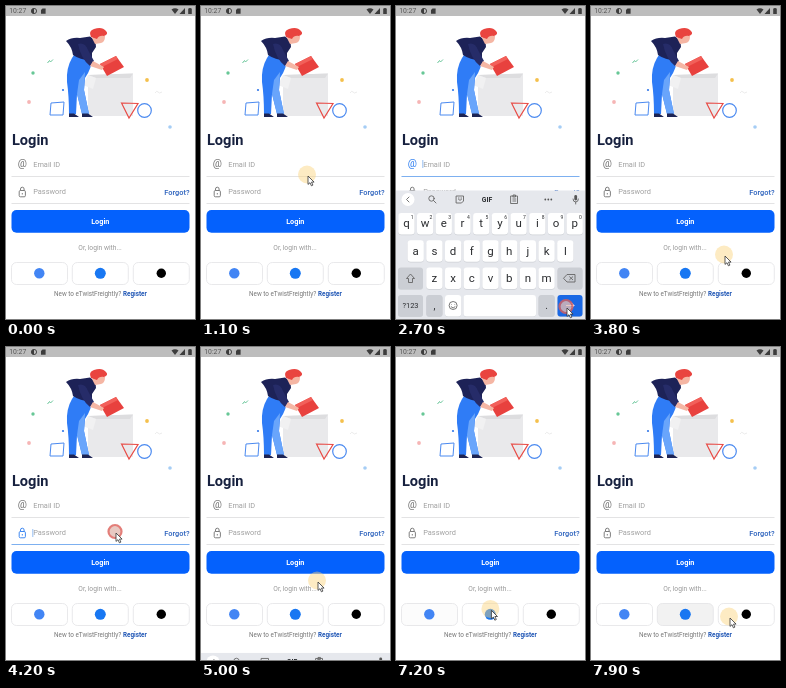
These frames come from a looping animation (189 by 313 pixels, 8 s). An HTML page:

```html
<!DOCTYPE html>
<html lang="en">
<head>
<meta charset="utf-8">
<title>Login screen</title>
<style>
html, body { margin: 0; width: 100%; height: 100%; overflow: hidden; background: #fff; }
svg { display: block; width: 100%; height: 100%; font-family: Roboto, Arial, sans-serif; }
.line { fill: none; stroke: #666; stroke-width: .9; }
.field { font-size: 7.4px; fill: #a0a0a0; }
.social rect { stroke: #e4e4e6; stroke-width: .8; }
.mid { text-anchor: middle; }
</style>
</head>
<body>
<svg viewBox="0 0 189 313">
  <!-- status bar -->
  <rect width="189" height="10" fill="#bdbdbd"/>
  <text x="3.300" y="7.400" font-size="6.800" fill="#555">10:27</text>
  <g fill="#3c3c3c">
    <circle cx="28" cy="5" r="2.600" fill="none" stroke="#3c3c3c" stroke-width=".9"/>
    <path d="M28 7.600V2.400A2.600 2.600 0 0 0 28 7.600Z"/>
    <path d="M36.500 2.400H39.600V7.800H35V4Z"/>
    <path d="M165.500 3.400Q169 1 172.500 3.400L169 8Z"/>
    <path d="M179 2V8H173.500Z"/>
    <path d="M182.200 2.600H183.200V2H184.800V2.600H185.800V8H182.200Z"/>
  </g>

  <!-- illustration -->
  <path d="M82 69L127 67.500V110H82Z" fill="#e9e9eb"/>
  <path d="M82 69L127 67.500L124 72H90Z" fill="#dddddf"/>
  <path d="M82 69L90 72L87 83L77 79Z" fill="#f1f1f2"/>
  <path d="M70 46L86 52Q86 62 79 72L78 84L83 108H76L71 88L70 108H63Q63 90 61 76Q60 62 66 52Z" fill="#2f7cf6"/>
  <path d="M79 66L78 84L83 108H76L71 88L73 74Z" fill="#69a5fb"/>
  <path d="M63 107.500H68L73 111H63ZM76 107.500H82L87 111H76Z" fill="#1d2454"/>
  <path d="M60 35Q66 31 74 32L84 30.500Q90 34 90 41L86 47L86 54Q76 55 67 49Q66 41 60 35Z" fill="#1d2257"/>
  <path d="M86 32L92 28L99 30Q99 36 95 37L89 38Z" fill="#f5b6a4"/>
  <path d="M85 31Q82 25 88 23Q96 20 100 25Q103 28 98 30Q93 29 91 33Z" fill="#e9443f"/>
  <path d="M94 58L110 50L118 61L101 70Z" fill="#e8413e"/>
  <path d="M94 58L110 50L112 53L96 61Z" fill="#f2605a"/>
  <path d="M72 38Q79 36 82 44L88 55L84 60Q75 53 72 38Z" fill="#262c69"/>
  <path d="M87 55L98 61L96 64L84 60Z" fill="#f5b6a4"/>
  <g fill="none" stroke-width="1">
    <path d="M45 97L58 96L57 109L44 109Z" stroke="#4b8af0"/>
    <path d="M115.500 97L132 97.500L123 112Z" stroke="#e84a45" stroke-width="1.200"/>
    <circle cx="138.500" cy="104.500" r="6.800" stroke="#4b8af0" stroke-width="1.200"/>
    <path d="M41.500 57L43.500 54.500L44.500 56L47 53.500" stroke="#6cc79c"/>
    <path d="M149 87Q151 84 152 86T156 86" stroke="#ececec"/>
  </g>
  <circle cx="27" cy="67" r="1.700" fill="#67c796"/>
  <circle cx="57" cy="84" r="1.100" fill="#3277e8"/>
  <circle cx="23" cy="96" r="1.900" fill="#f6b5b5"/>
  <circle cx="141" cy="74" r="1.900" fill="#f4c04c"/>
  <circle cx="164" cy="121" r="1.800" fill="#a5cdf5"/>

  <!-- form -->
  <text x="5.900" y="139" font-size="14.600" font-weight="700" fill="#17213f">Login</text>
  <text id="at" class="mid" x="16.300" y="161.200" font-size="10.200">@</text>
  <text class="field" x="27.200" y="160.700">Email ID</text>
  <path id="mailLine" d="M5.500 170.500H183.500"/>
  <g id="lock" class="line">
    <rect x="13.200" y="184.500" width="6.200" height="6.300" rx="1.200"/>
    <path d="M14.500 184.500V183a1.800 1.800 0 0 1 3.600 0V184.500M16.300 187V188.500"/>
  </g>
  <text class="field" x="27.200" y="188.300">Password</text>
  <path id="passLine" d="M5.500 197.500H183.500"/>
  <path id="caret" stroke="#6ba4ee" stroke-width=".7"/>
  <text x="183.500" y="189.300" font-size="7.400" font-weight="500" fill="#2c62bd" text-anchor="end">Forgot?</text>
  <rect x="5.500" y="204" width="178" height="22.700" rx="5" fill="#0461fd"/>
  <rect id="ripple" x="52" y="204" width="88" height="22.700" fill="#fff"/>
  <text class="mid" x="94.300" y="217.800" font-size="7.300" font-weight="700" fill="#fff">Login</text>
  <text class="mid" x="94" y="243.800" font-size="6.700" fill="#999">Or, login with...</text>
  <g class="social">
    <rect id="btnA" x="5.500" y="256.500" width="56" height="22" rx="5"/>
    <rect id="btnB" x="66.300" y="256.500" width="56" height="22" rx="5"/>
    <rect x="127.300" y="256.500" width="56" height="22" rx="5" fill="#fff"/>
    <circle cx="33.300" cy="267.300" r="5.200" fill="#4285f4"/>
    <circle cx="94.300" cy="267.300" r="5.500" fill="#1877f2"/>
    <circle cx="155.300" cy="267.300" r="4.700" fill="#000"/>
  </g>
  <text x="115.200" y="290" font-size="6.350" fill="#777" text-anchor="end">New to eTwistFreightly?</text>
  <text x="117" y="290" font-size="6.300" font-weight="700" fill="#1f56b5">Register</text>

  <g id="board"></g>

  <g id="pointer">
    <circle id="halo" cx="-1" cy="-1.500" stroke="#dd5f58"/>
    <path d="M0 0V8.400L2 6.700L3.400 9.800L4.900 9.100L3.500 6.100H6.100Z" fill="#fff" stroke="#333" stroke-width=".8"/>
  </g>
</svg>
<script>
const $ = id => document.getElementById(id);
const LOOP = 8000, BOARD_H = 128.500;

function buildBoard() {
  const key = (cx, y, w, fill = '#fff') =>
    `<rect x="${cx - w / 2}" y="${y + .7}" width="${w}" height="21.500" rx="3" fill="#cdd0d5"/>` +
    `<rect x="${cx - w / 2}" y="${y}" width="${w}" height="21.500" rx="3" fill="${fill}"/>`;
  const label = (s, x, y, size, weight = 400) =>
    `<text class="mid" x="${x}" y="${y}" font-size="${size}" font-weight="${weight}" fill="#2b2d30">${s}</text>`;
  let out = `<rect width="189" height="${BOARD_H + 1}" fill="#e6e8ed"/>`;

  // toolbar
  out += '<circle cx="12" cy="9" r="6.500" fill="#fff"/>' + label('GIF', 91, 11.500, 6.800, 700) +
    `<g class="line" stroke-linecap="round"><path d="M13 6.500L10.500 9L13 11.500"/>
    <circle cx="35.500" cy="8" r="2.700"/><path d="M37.500 10L40 12.500"/>
    <path d="M60.500 5.500H67.500V10.500L65.500 12.500H60.500ZM62.500 9Q64 11 65.500 9M62.500 7.500H63M65 7.500H65.500"/>
    <path d="M115 5.500H121.500V13H115ZM117 5.500V4.500H119.500V6.500H117ZM116.800 8.500H119.800M116.800 10.500H119.800"/>
    <path d="M177 8.500Q177 11.500 179.700 11.500T182.400 8.500M179.700 11.500V13.500"/></g>
    <rect x="178.300" y="4.500" width="2.800" height="5.500" rx="1.400" fill="#555"/>`;
  for (const x of [149.300, 152.300, 155.300]) out += `<circle cx="${x}" cy="9" r=".9" fill="#555"/>`;

  // letters
  ['qwertyuiop', 'asdfghjkl', 'zxcvbnm'].forEach((row, r) => {
    const x0 = [10.400, 19.700, 38.400][r], y = 22.500 + r * 27.300;
    [...row].forEach((c, i) => {
      const x = x0 + i * 18.700;
      out += key(x, y, 16.200) + label(c, x, y + 14.300, 11.500);
      if (!r) out += label((i + 1) % 10, x + 5.800, y + 6.200, 5);
    });
  });

  // function keys
  const grey = '#cbced4', y3 = 77.100, y4 = 104.400;
  out += key(14.500, y3, 25, grey) + key(174, y3, 25, grey) +
    key(14.500, y4, 25, grey) + label('?123', 14.500, y4 + 13.500, 7.500) +
    key(38.400, y4, 16.200, grey) + label(',', 38.400, y4 + 14, 10) +
    key(57.100, y4, 16.200) + key(103.800, y4, 72.500) +
    key(150.600, y4, 16.200, grey) + label('.', 150.600, y4 + 14, 10) +
    key(174, y4, 25, '#1a68e4') +
    `<g class="line"><path d="M14.500 83.500L18.500 88H16.500V92H12.500V88H10.500Z"/>
    <path d="M171 84H179V91.500H171L167.500 87.800ZM173.300 86L177 89.500M177 86L173.300 89.500"/>
    <circle cx="57.100" cy="115" r="4"/><path d="M54.900 116Q57.100 119 59.300 116M55.500 113.500V114M58.700 113.500V114"/></g>
    <path d="M170 115H178M175 112L178 115L175 118" fill="none" stroke="#fff"/>`;
  $('board').innerHTML = out;
}

// pointer stops: time, x, y
const PATH = [
  [300, 104, 258], [700, 104, 200], [800, 104, 200], [1200, 108, 160], [1500, 108, 162],
  [1700, 113, 190], [1800, 116, 212], [2200, 116, 212], [2600, 171, 302], [2800, 171, 302],
  [3500, 150, 275], [3800, 134, 250], [4100, 110, 186], [4300, 110, 186], [4700, 117, 235],
  [5000, 117, 235], [5300, 105, 208], [6000, 105, 211], [6200, 98, 208], [6400, 55, 252.500],
  [6600, 40, 263], [6800, 40, 263], [7100, 95, 263], [7600, 97, 265], [7900, 139, 271]
];
const CLICKS = [1400, 2700, 4200, 5900, 6700, 7500];

const clamp = v => Math.min(1, Math.max(0, v));
const easeOut = u => 1 - (1 - clamp(u)) ** 3;
const between = (t, a, b) => t >= a && t < b;
const slide = (t, open, close) => easeOut((t - open) / 200) - easeOut((t - close) / 200);
const flash = (t, at, ms) => t < at ? 0 : clamp(1 - (t - at) / ms);

function pointerAt(t) {
  let i = 1;
  while (i < PATH.length - 1 && PATH[i][0] < t) i++;
  const [t0, x0, y0] = PATH[i - 1], [t1, x1, y1] = PATH[i];
  const u = clamp((t - t0) / (t1 - t0));
  return [x0 + (x1 - x0) * u, y0 + (y1 - y0) * u];
}

function setLine(id, on) {
  $(id).setAttribute('stroke', on ? '#7db0f0' : '#dcdcde');
  $(id).setAttribute('stroke-width', on ? 1.100 : .8);
}

function shade(id, amount) {
  const v = Math.round(255 - 20 * amount);
  $(id).setAttribute('fill', `rgb(${v},${v},${v})`);
}

function draw(t) {
  const mail = between(t, 1500, 2900), pass = between(t, 4200, 4900);
  const iconColor = on => on ? '#2b7cf0' : '#707070';
  setLine('mailLine', mail);
  setLine('passLine', pass);
  $('at').setAttribute('fill', iconColor(mail));
  $('lock').style.stroke = iconColor(pass);
  $('caret').setAttribute('d', mail ? 'M26.800 154V162' : pass ? 'M26.800 182V190' : '');

  const up = slide(t, 1700, 2800) + slide(t, 4200, 4876);
  $('board').setAttribute('transform', `translate(0 ${313 - BOARD_H * up})`);

  $('ripple').setAttribute('opacity', .2 * flash(t, 5900, 700));
  shade('btnA', flash(t, 6700, 600));
  shade('btnB', flash(t, 7500, 1200));

  const down = CLICKS.some(c => between(t, c, c + 100));
  $('pointer').setAttribute('visibility', t < 300 ? 'hidden' : 'visible');
  $('pointer').setAttribute('transform', `translate(${pointerAt(t)})`);
  $('halo').setAttribute('r', down ? 6.500 : 9);
  $('halo').setAttribute('fill', down ? '#e3bcb4' : '#fbd27a');
  $('halo').setAttribute('stroke-width', down ? 2.200 : 0);
  $('halo').setAttribute('opacity', down ? .8 : .45);
}

buildBoard();
const start = performance.now();
function tick(now) {
  const t = Math.max(0, now - start) % LOOP;
  draw(Math.floor(t / 100) * 100); // ten steps a second
  requestAnimationFrame(tick);
}
draw(0);
requestAnimationFrame(tick);
</script>
</body>
</html>
```
